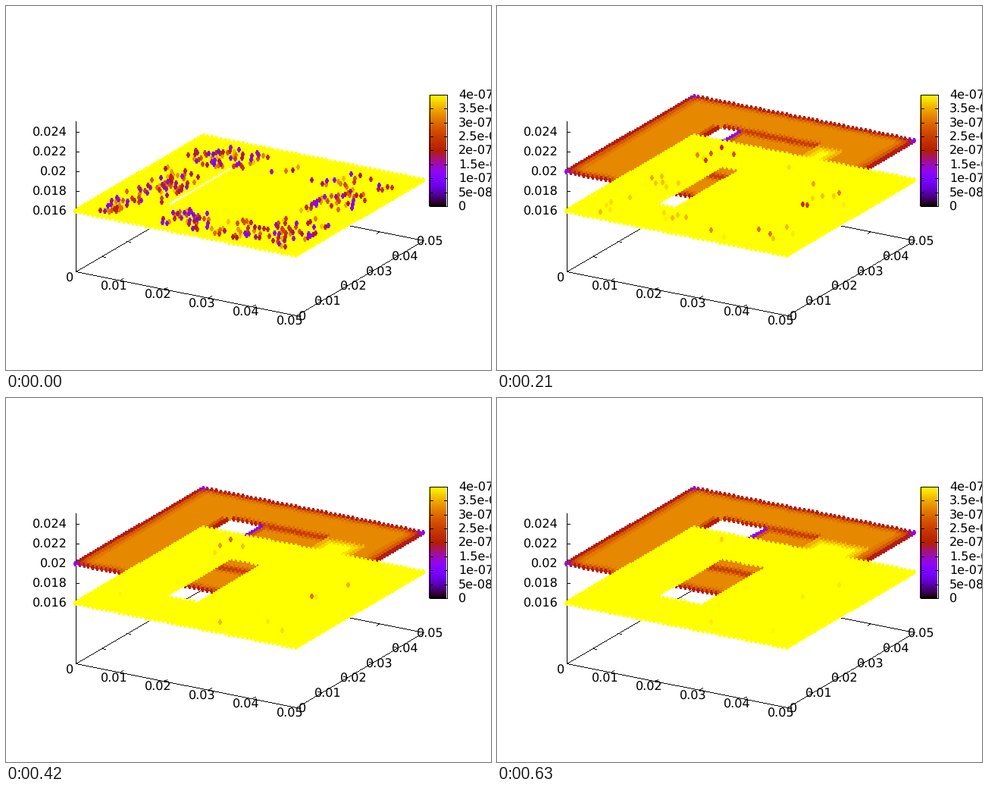
A matplotlib script for the animation above (0.7 s loop, 640 by 480 pixels).

```python
import numpy as np
import matplotlib.pyplot as plt
from matplotlib.animation import FuncAnimation
from matplotlib.collections import PolyCollection

W, H, DPI = 640, 480, 100
N = 50                       # grid steps per side
FRAMES, STEP = 10, 70
LO, HI = 13, 37              # rows of the sliding block
LEFT, RIGHT = 14, 37         # its columns at rest
XV, YV = np.array([290.5, 58]), np.array([168.5, -99])
LOW, TOP, BASE = (np.array([91, y]) for y in (270, 218, 350))
# stubby plus through pixel centres: 5 px wide, 7 px tall
QUARTER = np.array([(1, 3), (1, 1), (2, 1)])
MARK = np.concatenate([QUARTER, QUARTER[::-1] * (1, -1),
                       QUARTER * (-1, -1), QUARTER[::-1] * (-1, 1)]) + 0.5

I, J = np.indices((N + 1, N + 1))
ROWS = (J >= LO) & (J <= HI)

plt.rcParams["text.hinting"] = "none"


def palette(v):
    v = np.clip(v, 0, 1)
    return np.stack([np.sqrt(v), v**3, np.clip(np.sin(2 * np.pi * v), 0, 1)], -1)


def project(keep, origin):
    return origin + (np.outer(I[keep], XV) + np.outer(J[keep], YV)) / N


def make_spots(clumps=95, size=6, seed=11):
    """Clumps of low values around the block: start value and lifetime per cell."""
    rng = np.random.default_rng(seed)
    centres = rng.uniform(3, N - 3, (clumps, 1, 2))
    cells = np.round(centres + rng.normal(0, 1.6, (clumps, size, 2)))
    i, j = np.clip(cells, 3, N - 3).astype(int).reshape(-1, 2).T
    start, life = np.ones(I.shape), np.zeros(I.shape)
    start[i, j] = rng.uniform(0.22, 0.92, i.size)
    life[i, j] = np.minimum(rng.uniform(0, 1, i.size) ** (-1 / 1.9), FRAMES)
    start[(I >= LEFT - 1) & (I <= RIGHT) & ROWS] = 1
    return start, life


start, life = make_spots()


def in_hole(k):
    return (I >= LEFT) & (I <= LEFT + k) & ROWS


def lower_plate(k):
    age = k / np.maximum(life, 1)
    v = np.where(k < life, start + (1 - start) * age, 1)
    keep = ~in_hole(k)
    order = np.argsort(-v[keep], kind="stable")    # dark spots on top
    return project(keep, LOW)[order], v[keep][order]


def upper_plate(k):
    fade = np.array([0.6, 0.87, 0.96, 1])
    edge = lambda a: fade[np.minimum(np.minimum(a, N - a), 3)]
    v = 0.81 * edge(I) * edge(J)

    # seams along both sides of the block
    seam = np.minimum(abs(J - HI - 0.5), abs(J - LO + 0.5))
    beside = (I >= LEFT) & (I < RIGHT - 1)
    v[beside & (seam < 1)] *= 0.77
    v[beside & (seam > 1) & (seam < 2)] *= 0.92

    # rim of the opening
    gap = (I >= LEFT) & (I <= LEFT + k)
    v[gap & ((J == LO - 1) | (J == HI + 1))] = 0.52
    v[(I == LEFT - 1) & ROWS] = 0.5
    v[(I == LEFT + k + 1) & ROWS] = 0.3
    v[((I == LEFT - 2) | (I == LEFT + k + 2)) & ROWS] = 0.7

    # block pushed over the fixed part
    depth = np.minimum.reduce([I - RIGHT + 1, RIGHT + 1 + k - I, J - LO, HI - J])
    v = np.where(depth >= 0, 0.89 + 0.055 * np.minimum(depth, 2), v)

    keep = ~in_hole(k)
    return project(keep, TOP), v[keep]


fig = plt.figure(figsize=(W / DPI, H / DPI), dpi=DPI, facecolor="white")
ax = fig.add_axes([0, 0, 1, 1])


def line(p, q, z=1):
    """One-pixel line without smoothing."""
    p, q = np.round(p), np.round(q)
    n = int(abs(q - p).max()) + 1
    x, y = np.round(np.linspace(p, q, n)).T + 0.5
    ax.plot(x, y, ",", color="black", zorder=z)


def label(x, y, s, ha="center"):
    ax.text(x, y + 5.8, s, fontsize=11.5, family="DejaVu Sans", ha=ha,
            va="baseline", zorder=5)


def draw_axes():
    corners = [BASE, BASE + XV, BASE + XV + YV, BASE + YV]
    for p, q in zip(corners, corners[1:] + corners[:1]):
        line(p, q)
    line((91, 152), (91, 350))
    xt, yt = XV / 60, YV / 40
    for n in range(6):
        name = f"{n / 100:g}"
        px, py = BASE + XV * n / 5, BASE + YV * n / 5
        label(84.5 + 58 * n, 357.5 + 11.4 * n, name)
        label(391.5 + 33.7 * n, 409 - 19.8 * n, name)
        if 0 < n < 5:
            line(px, px + yt)
            line(px + YV, px + YV - yt)
            line(py, py + xt)
            line(py + XV, py + XV - xt)
    for n in range(5):
        y = 270 - 26 * n
        line((91, y), (95, y))
        label(80.5, y - 0.5, f"{0.016 + 0.002 * n:.3f}".rstrip("0"), "right")


def draw_colorbar():
    x0, x1, y0, y1 = 558, 581, 117, 264
    ramp = palette(np.linspace(1, 0, y1 - y0))[:, None]
    ax.imshow(ramp, extent=(x0, x1, y1, y0), aspect="auto",
              interpolation="nearest", zorder=3)
    for x in (x0, x1):
        line((x, y0), (x, y1), 4)
    for y in (y0, y1):
        line((x0, y), (x1, y), 4)
    for n in range(9):
        y = round(y1 + (y0 - y1) * n / 8)
        line((x0, y), (x0 + 4, y), 4)
        line((x1 - 4, y), (x1, y), 4)
        label(597, y - 0.5, f"{n * 5e-8:g}", "left")


draw_axes()
draw_colorbar()
ax.set_xlim(0, W)
ax.set_ylim(H, 0)
ax.axis("off")

points = PolyCollection([MARK], linewidths=0, edgecolors="none",
                        antialiaseds=False, snap=False, zorder=2)
ax.add_collection(points, autolim=False)


def update(k):
    plates = [upper_plate(k), lower_plate(k)] if k else [lower_plate(k)]
    pos, v = (np.concatenate(a) for a in zip(*plates))
    points.set_verts(np.round(pos)[:, None] + MARK)
    points.set_facecolor(palette(v))
    return [points]


anim = FuncAnimation(fig, update, frames=FRAMES, interval=STEP,
                     repeat=True, repeat_delay=0, blit=False)
plt.show()
```
